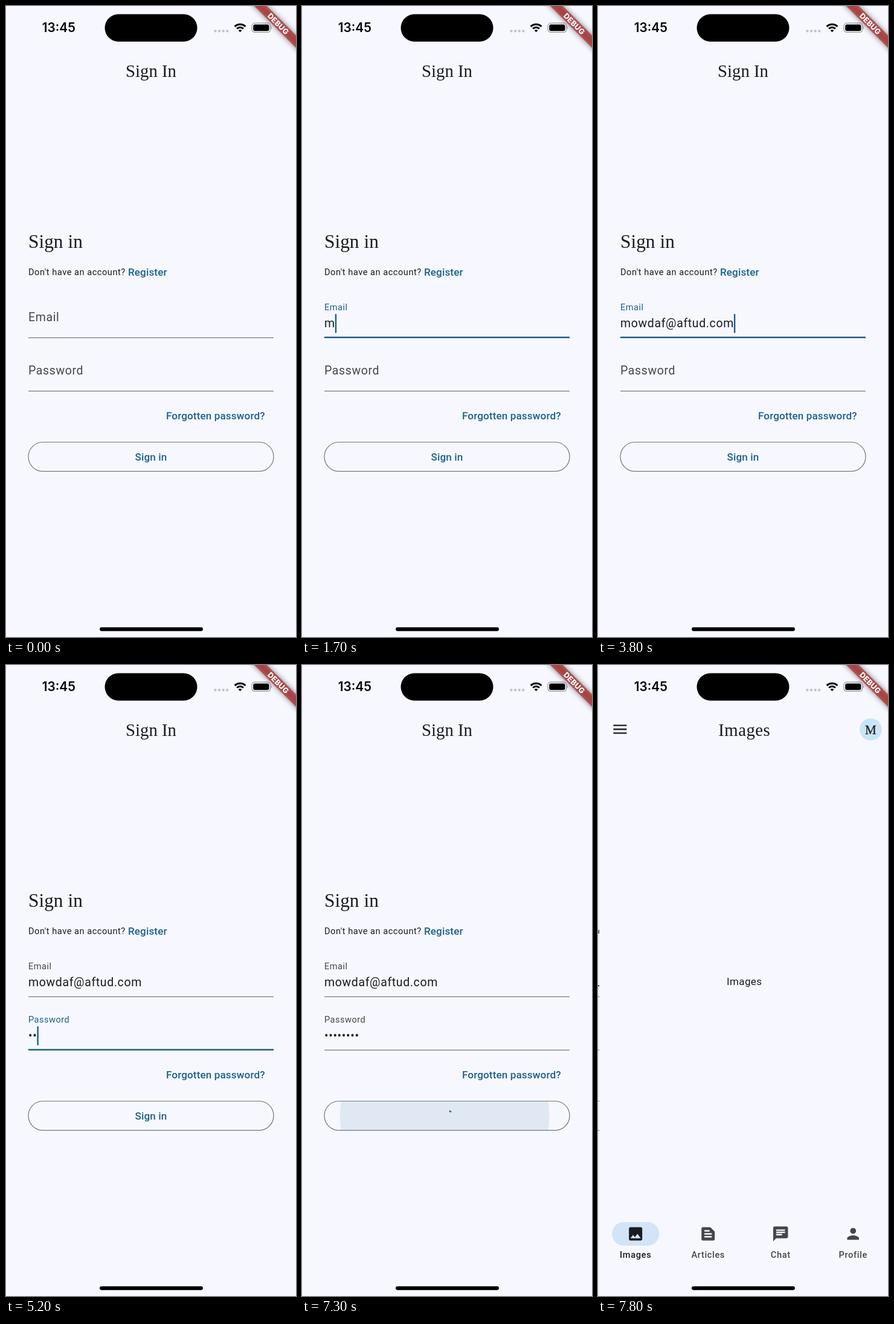
Recreate the animation shown at these times as an HTML page. Size 480 by 1041 pixels, loop 7.9 s.

```html
<!DOCTYPE html>
<html lang="en">
<head>
<meta charset="utf-8">
<title>Sign in flow</title>
<style>
  html, body { margin: 0; height: 100%; overflow: hidden; background: #f7f8ff; }
  svg { display: block; width: 100vw; height: 100vh; font-family: Roboto, sans-serif; }
  .serif { font-family: "Liberation Serif", serif; fill: #181c20; }
  .mid { text-anchor: middle; }
  .link { font-size: 17.1px; font-weight: 500; letter-spacing: .12px; fill: #1c6089; }
  .small { font-size: 14.66px; letter-spacing: .49px; fill: #181c20; }
  .input { font-size: 19.54px; letter-spacing: .61px; fill: #181c20; }
  .nav { font-size: 14.66px; font-weight: 500; letter-spacing: .61px; }
  .page { fill: #f7f8ff; }
  .accent { fill: #1c6089; }
</style>
</head>
<body>
<svg viewBox="0 0 480 1041" preserveAspectRatio="none">
  <defs>
    <clipPath id="pill"><rect x="37" y="719.5" width="406" height="48.5" rx="24.25"/></clipPath>
    <linearGradient id="edge"><stop offset="0" stop-opacity="0"/><stop offset="1" stop-opacity=".03"/></linearGradient>
    <filter id="soft" x="-20%" y="-200%" width="140%" height="500%"><feGaussianBlur stdDeviation="4.6"/></filter>
  </defs>

  <g id="login">
    <rect class="page" width="480" height="1041"/>
    <text class="serif mid" x="240" y="117" font-size="28.8">Sign In</text>
    <text class="serif" x="37" y="398.5" font-size="31.4">Sign in</text>
    <text class="small" x="37" y="444">Don't have an account?</text>
    <text class="link" x="202" y="444.5">Register</text>
    <g id="form"></g>
    <text class="link" x="265" y="681.5">Forgotten password?</text>
    <circle id="ripple" cy="744" clip-path="url(#pill)" fill="#1c6089"/>
    <rect x="37" y="719.5" width="406" height="48.2" rx="24.1" fill="none" stroke="#71787e" stroke-width="1.22"/>
    <text id="submit" class="link mid" x="240" y="750">Sign in</text>
    <circle id="spinner" r="9.3" pathLength="360" fill="none" stroke="#44546a" stroke-width="2.44"/>
  </g>

  <g id="home">
    <rect x="-24" width="24" height="1041" fill="url(#edge)"/>
    <rect class="page" width="480" height="1041"/>
    <path d="M23.2 99.6h22M23.2 106h22M23.2 112.4h22" stroke="#181c20" stroke-width="2.44"/>
    <text class="serif mid" x="240" y="117" font-size="28.8" letter-spacing=".5">Images</text>
    <circle cx="449.2" cy="106.2" r="18.3" fill="#c9e5f9"/>
    <text class="serif mid" x="449.2" y="114" font-size="21" stroke="#181c20" stroke-width=".3">M</text>
    <text class="mid" x="240" y="527.5" font-size="17.1" letter-spacing=".3" fill="#181c20">Images</text>
    <rect x="20.9" y="919" width="78.2" height="39" rx="19.5" fill="#d3e4f6"/>
    <g id="tabs"></g>
  </g>

  <g id="system">
    <text class="mid" x="87.3" y="43" font-family="Inter, sans-serif" font-size="20.8" font-weight="600">13:45</text>
    <rect x="163.5" y="13.5" width="153" height="45.2" rx="22.6"/>
    <path d="M346.4 41.3h21" stroke="#c4c5ca" stroke-width="4.4" stroke-linecap="round" stroke-dasharray="0 6.6"/>
    <g fill="none" stroke="#000">
      <path d="M378.6 33.8a13 13 0 0 1 17.8 0" stroke-width="3.1"/>
      <path d="M382.1 37.5a7.9 7.9 0 0 1 10.8 0" stroke-width="3"/>
    </g>
    <path d="M387.5 43.3l-2.9-3.1a4.3 4.3 0 0 1 5.8 0z"/>
    <rect x="407" y="28.2" width="30.6" height="15.2" rx="4.8" fill="none" stroke="#98999e" stroke-width="1.2"/>
    <rect x="409.2" y="30.4" width="26.2" height="10.8" rx="3"/>
    <path d="M439 33.2q2 2.6 0 5.2z" fill="#98999e"/>
    <g transform="translate(480) rotate(45)">
      <rect x="-60" y="34.2" width="120" height="14.66" opacity=".5" filter="url(#soft)"/>
      <rect x="-60" y="34.2" width="120" height="14.66" fill="#b71c1c" fill-opacity=".63"/>
      <text class="mid" y="46" font-family="Inter, sans-serif" font-size="12.4" font-weight="800" letter-spacing=".2" fill="#fff">DEBUG</text>
    </g>
    <rect x="155" y="1025" width="171" height="6.2" rx="3.1"/>
  </g>
</svg>

<script>
const LOOP = 7900, LEFT = 37, TAP = 7193, SLIDE = 7438;
const $ = id => document.getElementById(id);
const clamp = v => Math.min(1, Math.max(0, v));

function bezier(x1, y1, x2, y2) {
  const at = (a, b, s) => 3 * s * (1 - s) ** 2 * a + 3 * s * s * (1 - s) * b + s ** 3;
  return v => {
    const x = clamp(v);
    if (x === 0 || x === 1) return x;
    let lo = 0, hi = 1;
    for (let i = 0; i < 24; i++) {
      const m = (lo + hi) / 2;
      if (at(x1, x2, m) < x) lo = m; else hi = m;
    }
    return at(y1, y2, lo);
  };
}
const standard = bezier(.4, 0, .2, 1);
const ease = bezier(.25, .1, .25, 1);
const glide = bezier(.35, .91, .33, .97);

function add(parent, tag, attrs, text = '') {
  const el = document.createElementNS('http://www.w3.org/2000/svg', tag);
  set(el, attrs);
  el.textContent = text;
  return parent.appendChild(el);
}
function set(el, attrs) {
  for (const k in attrs) el.setAttribute(k, attrs[k]);
}

const range = (n, at) => Array.from({ length: n }, (_, i) => at(i));
const fields = [
  { name: 'Email', y: 548, on: 905, off: 3950, value: 'mowdaf@aftud.com',
    keys: range(16, i => 1690 + 140 * i) },
  { name: 'Password', y: 636, on: 3950, off: 7100, value: '••••••••',
    keys: range(8, i => i ? 5190 + 160 * (i - 1) : 4690) },
];
for (const f of fields) {
  const g = $('form');
  f.label = add(g, 'text', { class: 'input' }, f.name);
  f.input = add(g, 'text', { class: 'input', x: LEFT, y: f.y - 18 });
  add(g, 'rect', { x: LEFT, y: f.y - 1.3, width: 406, height: 1.22, fill: '#71787e' });
  f.line = add(g, 'rect', { class: 'accent', x: LEFT, y: f.y - 2.5, width: 406, height: 2.44 });
  f.caret = add(g, 'rect', { class: 'accent', y: f.y - 40, width: 2.44, height: 31.5, rx: 1 });
}

const tabs = {
  Images: 'M21 19V5c0-1.1-.9-2-2-2H5c-1.1 0-2 .9-2 2v14c0 1.1.9 2 2 2h14c1.1 0 2-.9 2-2zM8.5 13.5l2.5 3 3.5-4.5 4.5 6H5z',
  Articles: 'M20.4 8.4l-4.8-4.8C15.2 3.2 14.7 3 14.2 3H5c-1.1 0-2 .9-2 2v14c0 1.1.9 2 2 2h14c1.1 0 2-.9 2-2V9.8c0-.5-.2-1-.6-1.4zM7 7h7v2H7zM17 17H7v-2h10zM17 13H7v-2h10z',
  Chat: 'M20 2H4c-1.1 0-2 .9-2 2v18l4-4h14c1.1 0 2-.9 2-2V4c0-1.1-.9-2-2-2zM6 9h12v2H6zM14 14H6v-2h8zM18 8H6V6h12z',
  Profile: 'M12 12a4 4 0 1 0 0-8 4 4 0 0 0 0 8zm0 2c-2.7 0-8 1.3-8 4v2h16v-2c0-2.7-5.3-4-8-4z',
};
Object.entries(tabs).forEach(([name, d], i) => {
  const x = 60 + 120 * i, fill = i ? '#41474d' : '#181c20';
  add($('tabs'), 'path', { d, fill, 'fill-rule': 'evenodd', transform: `translate(${x - 14.66} 923.8) scale(1.2214)` });
  add($('tabs'), 'text', { class: 'nav mid', x, y: 977.5, fill }, name);
});

function drawField(f, t) {
  const count = f.keys.filter(k => k <= t).length;
  const raised = standard((t - f.on) / 167);
  const focus = raised - standard((t - f.off) / 167);
  const last = count ? f.keys[count - 1] : f.on;
  const blinkOn = t >= f.on && t < f.off && (t - last) % 1000 < 500;
  f.input.textContent = f.value.slice(0, count);
  f.label.style.fill = `color-mix(in srgb, #1c6089 ${focus * 100}%, #41474d)`;
  set(f.label, { transform: `translate(${LEFT} ${f.y - 28 - 18.5 * raised}) scale(${1 - .25 * raised})` });
  set(f.line, { opacity: focus });
  set(f.caret, { x: LEFT + (count ? f.input.getComputedTextLength() : 0), opacity: +blinkOn });
}

function drawButton(age) {
  const loading = age >= 0;
  const grow = ease(age / 225);
  set($('ripple'), {
    cx: 222 + 18 * grow,
    r: 204.5 * (.3 + .7 * grow),
    opacity: .1 * clamp(age / 75) * (1 - clamp((age - 225) / 150)),
  });
  set($('submit'), { opacity: +!loading });
  const p = age / 1333;
  const head = standard(p * 2), tail = standard(p * 2 - 1);
  const start = 270 * tail + 360 * age / 2222 + 90 * p - 90;
  set($('spinner'), {
    opacity: +loading,
    transform: `translate(240 744) rotate(${start})`,
    'stroke-dasharray': `${Math.max(.1, 270 * (head - tail))} 720`,
  });
}

function frame() {
  const t = performance.now() % LOOP;
  fields.forEach(f => drawField(f, t));
  drawButton(t - TAP);
  const slide = glide((t - SLIDE) / 400);
  set($('login'), { transform: `translate(${-160 * slide})` });
  set($('home'), { transform: `translate(${480 * (1 - slide)})`, visibility: slide ? 'visible' : 'hidden' });
  requestAnimationFrame(frame);
}
frame();
</script>
</body>
</html>
```
